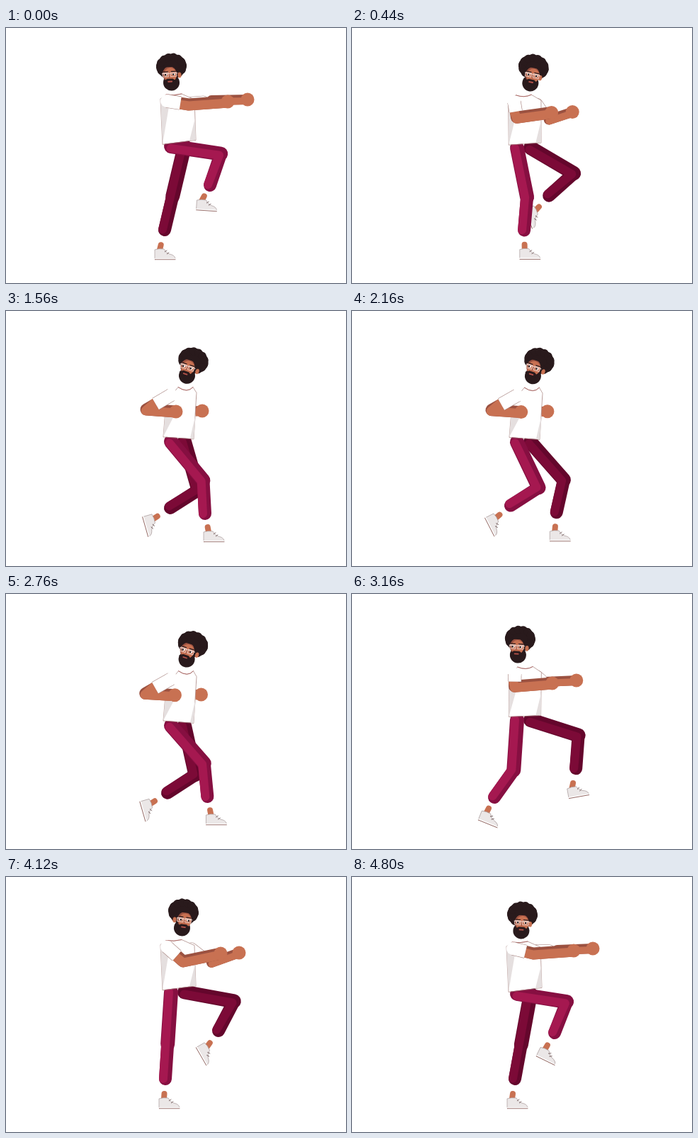
Write an HTML page with a canvas that moves like this. It is 480 by 360 pixels and loops after 4840 ms.

```html
<!DOCTYPE html>
<html lang="en">
<head>
<meta charset="utf-8">
<title>Dancer</title>
<style>
html, body { margin: 0; width: 100%; height: 100%; overflow: hidden; background: #fff; }
canvas { display: block; width: 480px; height: 360px; }
</style>
</head>
<body>
<canvas id="stage" width="480" height="360"></canvas>
<script>
const ctx = document.getElementById('stage').getContext('2d');
const LOOP = 4840, BEAT = LOOP / 8, STEP = 40;
const SKIN = '#c87152', SKIN_DARK = '#9b5140', HAIR = '#291a1c';
const EDGE = '#a5807c', SHADE = '#e5dfdf';

// time, hem y, turn (0 front, 1 back), head x, y, tilt, look
const BODY = [
  [0, 161, 0, 233.5, 54, -3, -3],
  [160, 174, .55, 239, 65, 5, -4],
  [270, 184, 1, 252, 73, 11, -4],
  [315, 182, 1, 259, 71, 14, -4],
  [350, 178.5, 1, 264.5, 70, 18, -5],
  [490, 156.5, 0, 250.5, 49, 8, 3],
  [565, 159, 0, 240.5, 53, 4, 0]
];
// time, near elbow x, y, near hand x, y, far elbow y, far hand x, y
const ARMS = [
  [0, 258, 108, 313, 104, 102, 341, 101],
  [160, 224, 134, 276, 130, 128, 311, 126],
  [270, 199, 146, 239, 144, 144, 276, 144],
  [315, 199, 143, 241, 141, 142, 277, 141],
  [350, 198, 139, 240, 142, 142, 277, 141],
  [490, 250, 119, 303, 108, 121, 329, 107],
  [565, 256, 108, 313, 104, 103, 340, 101]
];
// time, cuff x, y, shoe x, y, shoe turn
const NEAR_LEG = [
  [0, 288, 222, 283, 250, 4],
  [130, 308, 245, 312, 277, -10],
  [240, 310, 282, 318, 317, 0],
  [350, 281, 286, 293, 318, 0],
  [490, 225, 285, 230, 319, 0],
  [565, 222, 285, 226, 319, 0],
  [605, 217, 285, 218, 319, 0],
  [740, 201, 287, 194, 317, 22],
  [885, 205, 287, 186, 311, 65],
  [920, 212, 285, 188, 310, 64],
  [1100, 285, 219, 271, 253, 55],
  [1170, 286, 220, 276, 252, 26]
];
const FAR_LEG = [
  [0, 303, 220, 292, 247, 4],
  [130, 316, 245, 318, 277, -10],
  [240, 313, 282, 320, 317, 0],
  [315, 299, 284, 304, 317, 0],
  [495, 233, 285, 236, 318, 0],
  [565, 230, 285, 233, 319, 0],
  [605, 224, 285, 224, 319, 0],
  [740, 207, 286, 201, 314, 20],
  [885, 213, 286, 192, 309, 64],
  [955, 232, 278, 204, 302, 74],
  [1095, 300, 217, 282, 249, 60],
  [1170, 302, 219, 287, 249, 28]
];

const mix = (a, b, k) => a + (b - a) * k;

// Smooth cyclic interpolation through the rows of a table.
function sample(rows, period, time) {
  const t = time % period, n = rows.length;
  const row = i => rows[(i + n) % n];
  const at = i => row(i)[0] + Math.floor(i / n) * period;
  let i = n - 1;
  while (rows[i][0] > t) i--;
  const span = at(i + 1) - at(i), k = (t - at(i)) / span;
  const k2 = k * k, k3 = k2 * k;
  return row(i).slice(1).map((a, c) => {
    const v = j => row(j)[c + 1], b = v(i + 1);
    const m0 = (b - v(i - 1)) / (at(i + 1) - at(i - 1)) * span;
    const m1 = (v(i + 2) - a) / (at(i + 2) - at(i)) * span;
    return a * (2 * k3 - 3 * k2 + 1) + m0 * (k3 - 2 * k2 + k)
      + b * (3 * k2 - 2 * k3) + m1 * (k3 - k2);
  });
}

function trace(points, closed) {
  ctx.beginPath();
  points.forEach(p => ctx.lineTo(p[0], p[1]));
  if (closed) ctx.closePath();
}

function line(points, width, color, cap = 'round') {
  trace(points);
  ctx.lineWidth = width;
  ctx.lineCap = cap;
  ctx.lineJoin = 'round';
  ctx.strokeStyle = color;
  ctx.stroke();
}

function fill(points, color) {
  trace(points, true);
  ctx.fillStyle = color;
  ctx.fill();
}

function oval(x, y, rx, ry, color) {
  ctx.beginPath();
  ctx.ellipse(x, y, rx, ry, 0, 0, 7);
  ctx.fillStyle = color;
  ctx.fill();
}

// A round limb with its lit side shifted along the normal.
function limb(points, width, dark, light, shift) {
  line(points, width, dark);
  const lit = points.map((p, i) => {
    const a = points[Math.max(i - 1, 0)], b = points[Math.min(i + 1, points.length - 1)];
    const dx = b[0] - a[0], dy = b[1] - a[1], d = Math.hypot(dx, dy) || 1;
    return [p[0] - dy / d * shift, p[1] + dx / d * shift];
  });
  line(lit, width - 2 * shift, light);
}

function kneeOf(hip, cuff) {
  const thigh = 71, shin = 47;
  const dx = cuff[0] - hip[0], dy = cuff[1] - hip[1], d = Math.hypot(dx, dy);
  if (d >= thigh + shin) return [hip[0] + dx * .6, hip[1] + dy * .6];
  const along = (thigh * thigh - shin * shin + d * d) / (2 * d);
  const out = Math.sqrt(Math.max(0, thigh * thigh - along * along));
  return [hip[0] + (dx * along + dy * out) / d, hip[1] + (dy * along - dx * out) / d];
}

function drawShoe(x, y, turn, cuff) {
  const r = turn * Math.PI / 180, c = Math.cos(r), s = Math.sin(r);
  const ankle = [x - 7 * c + 6 * s, y - 7 * s - 6 * c];
  const dx = cuff[0] - ankle[0], dy = cuff[1] - ankle[1], d = Math.hypot(dx, dy) || 1;
  line([ankle, [ankle[0] + dx / d * 7, ankle[1] + dy / d * 7]], 8, SKIN);
  ctx.save();
  ctx.translate(x, y);
  ctx.rotate(r);
  ctx.beginPath();
  ctx.moveTo(-14, 7);
  ctx.lineTo(-14, -6);
  ctx.quadraticCurveTo(-8, -8, -1, -7);
  ctx.quadraticCurveTo(3, 0, 10, 1);
  ctx.quadraticCurveTo(15, 3, 15, 7);
  ctx.closePath();
  ctx.fillStyle = '#ebe7e7';
  ctx.fill();
  ctx.lineWidth = .7;
  ctx.strokeStyle = '#a99b9b';
  ctx.stroke();
  line([[-14, 6.8], [15, 6.8]], 1.8, '#fff');
  line([[-14, 7.8], [15, 7.8]], .8, '#8a5a55');
  line([[0, -3], [3, -5]], .8, '#6d5555');
  line([[3, 0], [6, -2]], .8, '#6d5555');
  ctx.restore();
}

function drawLeg(hip, pose, dark, light) {
  const [cx, cy, sx, sy, turn] = pose, cuff = [cx, cy];
  drawShoe(sx, sy, turn, cuff);
  const knee = kneeOf(hip, cuff);
  line([hip, knee], 20, dark);
  limb([hip, knee, cuff], 18, dark, light, 3);
}

function drawShirt(hem, turn) {
  const at = (x0, y0, x1, y1) => [mix(x0, x1, turn), hem + mix(y0, y1, turn)];
  const left = at(218, -61, 226, -50), hemL = at(221, 3, 222, -1), hemR = at(268, -3, 265, 2);
  const collarL = at(226, -67, 243, -71), dip = at(237, -65, 256, -62);
  const collarR = at(248, -68, 264, -71), right = at(266, -60, 269, -63);
  ctx.beginPath();
  ctx.moveTo(...hemL);
  ctx.lineTo(...left);
  ctx.lineTo(...collarL);
  ctx.quadraticCurveTo(...dip, ...collarR);
  ctx.lineTo(...right);
  ctx.lineTo(...hemR);
  ctx.closePath();
  ctx.fillStyle = '#fff';
  ctx.fill();
  ctx.lineWidth = .7;
  ctx.strokeStyle = EDGE;
  ctx.stroke();
  fill([left, at(230, -50, 238, -32), hemL], SHADE);
  fill([at(267, -34, 268, -34), hemR, at(259, -2, 260, 1)], SHADE);
  ctx.beginPath();
  ctx.moveTo(...collarL);
  ctx.quadraticCurveTo(...dip, ...collarR);
  ctx.strokeStyle = '#a34b48';
  ctx.stroke();
}

function drawHead(x, y, tilt, look) {
  ctx.save();
  ctx.translate(x, y);
  ctx.rotate(tilt * Math.PI / 180);
  oval(0, 0, 21.5, 17.5, HAIR);
  for (let i = 0; i < 14; i++) {
    const a = i * Math.PI / 7;
    oval(Math.cos(a) * 16, Math.sin(a) * 13, 5.6, 5.6, HAIR);
  }
  const jaw = look * .4;
  oval(jaw, 23, 11.5, 11.5, HAIR);
  oval(look < 1 ? jaw + 12 : jaw - 12, 13, 2.6, 3.8, SKIN);
  ctx.save();
  ctx.beginPath();
  ctx.rect(-20, 1, 40, 30);
  ctx.clip();
  oval(look, 11, 10, 11, SKIN_DARK);
  oval(look + 1, 12, 9, 10, SKIN);
  ctx.restore();
  fill([[look - 9, 21], [look - 4, 17.5], [look + 4, 17.5], [look + 9, 21], [look + 6, 25], [look - 6, 25]], HAIR);
  line([[look - 2.5, 21.5], [look + 2.5, 21.5]], 1.8, '#b8534b');
  line([[look, 11], [look + Math.sign(look), 15.5]], 1.2, SKIN_DARK);
  for (const side of [-5.5, 5.5]) {
    const ex = look + side;
    line([[ex - 3, 7.5], [ex + 3, 7.5]], 1.3, HAIR);
    oval(ex, 11.5, 2.4, 1.7, '#fff');
    oval(ex + look * .15, 11.5, 1.3, 1.5, HAIR);
    ctx.strokeStyle = '#ecd0c8';
    ctx.lineWidth = .9;
    ctx.strokeRect(ex - 4, 9, 8, 5.5);
  }
  line([[look - 11, 10], [look + 11, 10]], .9, '#ecd0c8');
  ctx.restore();
}

function sleeve(from, to, width) {
  line([from, to], width + 1.2, EDGE);
  line([from, to], width, '#fff');
}

function drawNearArm(shoulder, elbow, hand) {
  const cuff = [mix(shoulder[0], elbow[0], .62), mix(shoulder[1], elbow[1], .62)];
  limb([cuff, elbow, hand], 17, SKIN_DARK, SKIN, 2);
  oval(hand[0], hand[1], 9.5, 9.5, SKIN);
  line([shoulder, cuff], 19.2, EDGE, 'butt');
  line([shoulder, cuff], 18, '#fff', 'butt');
  oval(shoulder[0], shoulder[1], 9, 9, '#fff');
}

function drawFarArm(shoulder, elbow, hand) {
  limb([elbow, hand], 14, SKIN_DARK, SKIN, 2);
  oval(hand[0], hand[1], 9.5, 9.5, SKIN);
  sleeve(shoulder, [mix(shoulder[0], elbow[0], .6), mix(shoulder[1], elbow[1], .6)], 13);
}

function draw(time) {
  const [hem, turn, hx, hy, tilt, look] = sample(BODY, BEAT, time);
  const [nex, ney, nhx, nhy, fey, fhx, fhy] = sample(ARMS, BEAT, time);
  ctx.fillStyle = '#fff';
  ctx.fillRect(0, 0, 480, 360);
  drawFarArm([262, hem - 57], [mix(290, 252, turn), fey], [fhx, fhy]);
  drawLeg([252, hem + 6], sample(FAR_LEG, BEAT * 2, time + BEAT), '#64062c', '#7c0a37');
  drawLeg([233, hem + 6], sample(NEAR_LEG, BEAT * 2, time), '#860f41', '#a51850');
  drawShirt(hem, turn);
  drawHead(hx, hy, tilt, look);
  drawNearArm([mix(227, 233, turn), hem + mix(-58, -60, turn)], [nex, ney], [nhx, nhy]);
}

const start = performance.now();
function tick(now) {
  const t = Math.max(0, now - start) % LOOP;
  draw(Math.floor(t / STEP) * STEP);
  requestAnimationFrame(tick);
}
draw(0);
requestAnimationFrame(tick);
</script>
</body>
</html>
```
